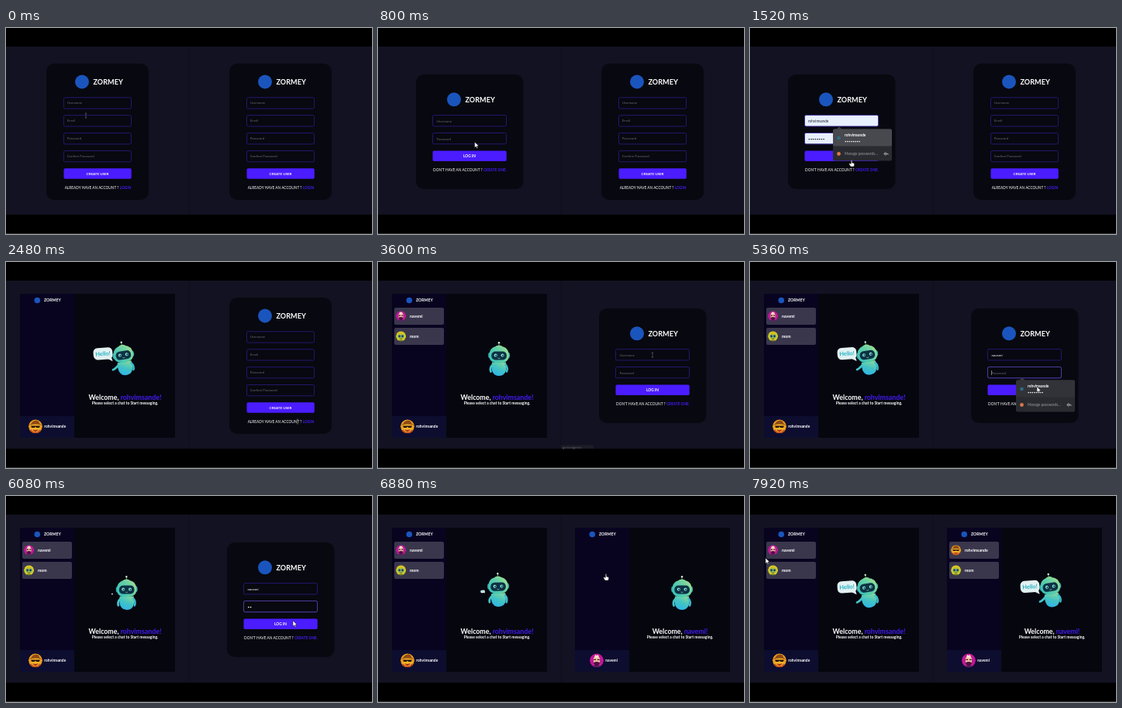
Recreate the animation shown at these times as an HTML page. Size 472 by 266 pixels, loop 8000 ms.

```html
<!DOCTYPE html>
<html lang="en">
<head>
<meta charset="utf-8">
<title>Two-window chat sign-in</title>
<style>
  html, body { margin: 0; width: 100%; height: 100%; overflow: hidden; background: #000; }
  svg { display: block; width: 100vw; height: 100vh; }
  text { font-family: Lato, "Open Sans", sans-serif; fill: #fff; white-space: pre; }
  .b { font-weight: 700; }
  .mid { text-anchor: middle; }
  .blue { fill: #431cf0; font-weight: 700; }
  .hint { fill: #66666e; }
  .note { fill: #9a9ba0; }
  .ink { fill: #20222c; }
  .hello { fill: #22b2c6; }
  .card { fill: #080810; }
  .field { fill: none; stroke: #2b1a86; stroke-width: .8; }
  .focus { stroke: #5646a8; }
  .filled { fill: #e8f0fe; }
  .button { fill: #4a1cff; }
</style>
</head>
<body>
<svg id="stage" viewBox="0 0 472 266" xmlns="http://www.w3.org/2000/svg">
  <defs>
    <linearGradient id="head" x1="0" y1=".6" x2="1" y2="0">
      <stop offset="0" stop-color="#3cc3b8"/>
      <stop offset=".6" stop-color="#6fd3a3"/>
      <stop offset="1" stop-color="#b5e58c"/>
    </linearGradient>
    <linearGradient id="body" x1=".8" y1="0" x2=".3" y2="1">
      <stop offset="0" stop-color="#86d99c"/>
      <stop offset=".5" stop-color="#41c3c4"/>
      <stop offset="1" stop-color="#2fb4ea"/>
    </linearGradient>
    <clipPath id="disc"><circle r="10"/></clipPath>

    <g id="av-hat" clip-path="url(#disc)">
      <circle r="10" fill="#eb9d1f"/>
      <path d="M-10 10V6Q0 3 10 6V10Z" fill="#c8501c"/>
      <ellipse cy="2" rx="6.5" ry="6" fill="#f2b22a"/>
      <path d="M-9-2Q0-4 9-2L5.5-4.5Q5-9 0-8.5T-5.5-4.5Z" fill="#8f4a16"/>
      <path d="M-6.5-.8H6.5L5.5 2H1.5L0 .5-1.5 2H-5.5Z" fill="#2a1510"/>
      <path d="M-4 4.5Q0 6 4 4.5 3 7.5 0 7.5T-4 4.5Z" fill="#a3281a"/>
    </g>
    <g id="av-pink" clip-path="url(#disc)">
      <circle r="10" fill="#c4159a"/>
      <path d="M-8 10Q0 3 8 10Z" fill="#5b1b6b"/>
      <path d="M-4.5-3L0-8 4.5-3V3Q0 9-4.5 3Z" fill="#ecc0a0"/>
      <path d="M-3.5-4L-2-8.5 0-6 2-8.5 3.5-4Z" fill="#f3e3c8"/>
      <path d="M-4-1H-1M1-1H4" stroke="#351032" stroke-width="1.6"/>
      <path d="M-4.5 3Q0 .5 4.5 3 3 8 0 8T-4.5 3Z" fill="#4a1438"/>
    </g>
    <g id="av-mom" clip-path="url(#disc)">
      <circle r="10" fill="#cfca24"/>
      <path d="M-7 10Q0 4 7 10Z" fill="#6a7a1d"/>
      <ellipse cy=".5" rx="6" ry="6.5" fill="#b0bd3c"/>
      <path d="M-6.5-3Q0-11 6.5-3Q0-5.5-6.5-3Z" fill="#e0b624"/>
      <g fill="#173a48" stroke="#4a98a5"><circle cx="-3" r="2.4"/><circle cx="3" r="2.4"/></g>
      <path d="M-2 5H2" stroke="#173a48"/>
    </g>

    <path id="arrow" d="M0 0V7.2L1.8 5.7 3 8.3 4.1 7.8 3 5.3 5.2 5.1Z" fill="#fff" stroke="#111" stroke-width=".5"/>
    <path id="hand" d="M-.7-3Q0-4 .7-3V0L3.2.7Q3.8 1 3.6 2L3 5H-1.2L-3.2 1.8Q-3-.1-.7 1.4Z" fill="#fff" stroke="#111" stroke-width=".5"/>
    <path id="beam" d="M-1.2-3H1.2M0-3V3M-1.2 3H1.2" fill="none" stroke="#85858f" stroke-width=".5"/>
  </defs>
</svg>
<script>
const LOOP = 8000, STEP = 80, HALF = 236;
const BRAND = 'ZORMEY', ANN = 'navemi', BOB = 'rohvimsande', MOM = 'mom';
const SECRET = '••••••••';
const AVATAR = { [ANN]: 'av-pink', [BOB]: 'av-hat', [MOM]: 'av-mom' };

const text = (x, y, size, str, cls = '') =>
  `<text x="${x}" y="${y}" font-size="${size}" class="${cls}">${str}</text>`;
const rect = (x, y, w, h, r, attrs) =>
  `<rect x="${x}" y="${y}" width="${w}" height="${h}" rx="${r}" ${attrs}/>`;
const on = (from, to, body) => `<g data-on="${from},${to}">${body}</g>`;
const at = (x, y, body) => `<g transform="translate(${x} ${y})">${body}</g>`;
const typed = (x, y, size, str, from, to) =>
  `<text x="${x}" y="${y}" font-size="${size}" data-typed="${str}" data-span="${from},${to}"></text>`;
const avatar = (name, x, y, r) =>
  `<use href="#${AVATAR[name]}" transform="translate(${x} ${y}) scale(${r / 10})"/>`;
const logo = (x, y, r) => `<circle cx="${x}" cy="${y}" r="${r}" fill="#1a55bd"/>`;

const header = y => logo(98, y, 9) + text(112.5, y + 3.4, 9.1, BRAND, 'b');
const hint = (x, y, str) => text(x, y, 4.4, str, 'hint');
const field = (x, y, w, cls = '') => rect(x, y, w, 14.3, 1.8, `class="field ${cls}"`);
const button = (x, y, w, label, size) =>
  rect(x, y, w, 13.5, 1.8, 'class="button"') + text(118, y + 8.3, size, label, 'b mid');
const footer = (y, ask, link) =>
  text(118.5, y, 4.75, `${ask} ? <tspan class="blue">${link}</tspan>`, 'mid');

const register = () =>
  rect(52, 46, 132, 176, 10, 'class="card"') + header(69.5) +
  ['Username', 'Email', 'Password', 'Confirm Password'].map((label, i) => {
    const y = 89.8 + 22.9 * i;
    return field(74.5, y, 87, '') + hint(78.7, y + 8.6, label);
  }).join('') +
  button(74.5, 181.2, 87.3, 'CREATE USER', 4.5) +
  footer(207.6, 'ALREADY HAVE AN ACCOUNT', 'LOGIN');

const userField = cls => field(70.5, 112.6, 95, cls);
const passField = cls => field(70.5, 135.5, 95, cls);
const login = () =>
  rect(49, 60, 138.5, 148, 10, 'class="card"') + header(92.3) +
  userField() + passField() +
  button(70.5, 158.6, 95.2, 'LOG IN', 4.8) +
  footer(184.8, "DON'T HAVE AN ACCOUNT", 'CREATE ONE.');

const savedLogin = (x, y, top) => at(x, y,
  '<path d="M4 .5L8-3 12 .5Z" fill="#3b3c42"/>' +
  rect(0, 0, 76, 41, 2, 'fill="#2a2b30"') + rect(0, 0, 76, 22, 2, `fill="${top}"`) +
  '<circle cx="7.5" cy="11.5" r="2.3" fill="#2b6f86"/>' +
  text(15, 9.3, 4.8, BOB, 'b') + text(15, 17.3, 4.4, SECRET) +
  '<circle cx="7.5" cy="32" r="2.4" fill="#d9784a"/>' +
  text(15, 33.6, 4.7, 'Manage passwords…', 'note') +
  '<path d="M66 32a1.6 1.6 0 1 0 0-.1H71V33.4" fill="none" stroke="#aaa" stroke-width=".9"/>');

const robot = id =>
  `<g id="${id}">
    <path d="M156 108V103" stroke="#5fbf9e" stroke-width=".8"/>
    <circle cx="156" cy="102.7" r="1.2" fill="#d8f2d0"/>
    <path class="arm" fill="none" stroke="#45c3c8" stroke-width="2.8" stroke-linecap="round"/>
    <path d="M147 128H165Q167 140 161.5 144 156 147 150.5 144 145 140 147 128Z" fill="url(#body)"/>
    <path d="M164.5 131Q168 135 166 140" fill="none" stroke="#3bbbd0" stroke-width="2.6" stroke-linecap="round"/>
    <rect x="142.2" y="115" width="27.8" height="8" rx="3" fill="#39a9a6"/>
    <path d="M143.5 120Q143 107.5 156 107 169 107.5 168.7 120 168.5 129 156 129 143.7 129 143.5 120Z" fill="url(#head)"/>
    <path d="M151 107.8Q156 104 161 107.8Z" fill="#8bdc93"/>
    <rect x="146.3" y="114" width="19.6" height="11" rx="5" fill="#0d3244"/>
    <g fill="#8eeadf"><circle cx="151.7" cy="119" r="2"/><circle cx="160.5" cy="119" r="2"/></g>
    <g fill="#0d3244"><circle cx="152.1" cy="119.2" r="1"/><circle cx="160.9" cy="119.2" r="1"/></g>
    <path d="M154.5 122.5Q156 123.8 157.5 122.5" fill="none" stroke="#8eeadf" stroke-width=".6"/>
  </g>
  <g id="${id}-bubble">
    <rect x="113.3" y="109" width="24.7" height="15.3" rx="5.5" fill="#e2f1f1"/>
    <path d="M130 123L137.5 127.3 136 121Z" fill="#e2f1f1"/>
    ${text(125.6, 119.3, 7.4, 'Hello!', 'b mid hello')}
  </g>`;

const contact = (name, y) =>
  rect(21, y, 64, 22, 2, 'fill="#3a374d"') + avatar(name, 29.6, y + 10.8, 6.6) +
  text(41, y + 12.8, 5.2, name, 'b');

const chat = (me, others, id, loaded, faceX) =>
  rect(18, 41, 200, 186, 0, 'fill="#06060f"') +
  rect(18, 41, 70, 186, 0, 'fill="#080420"') +
  logo(40.3, 49.5, 3.8) + text(49, 51.4, 5.2, BRAND, 'b') +
  on(loaded, LOOP, others.map((name, i) => contact(name, 59 + 26 * i)).join('')) +
  rect(18, 199, 70, 28, 0, 'fill="#0d0d30"') +
  avatar(me, faceX, 212.3, 9) + text(faceX + 11.3, 214, 4.9, me, 'b') +
  robot(id) +
  text(153.5, 177.6, 8.8, `Welcome, <tspan class="blue">${me}!</tspan>`, 'b mid') +
  text(153.5, 184.2, 4.95, 'Please select a chat to Start messaging.', 'b mid');

const linkTip = (from, to) => on(from, to,
  rect(0, 236.5, 42, 4.5, 0, 'fill="#1c1d26"') + hint(2, 241, 'go to sign-in'));

const left =
  on(0, 560, register()) +
  on(560, 2400, login() +
    on(560, 1120, hint(75.5, 121.5, 'Username') + hint(75.5, 144.5, 'Password')) +
    on(960, 1120, userField('focus')) +
    on(1120, 2400, userField('filled') + passField('filled') +
      text(75, 121.6, 4.7, BOB, 'ink') + text(75, 144.6, 4.6, SECRET, 'ink')) +
    on(960, 1600, savedLogin(107, 130.5, '#48494f'))) +
  on(2400, LOOP, chat(BOB, [ANN, MOM], 'bot-a', 2560, 38)) +
  linkTip(320, 640);

const right =
  on(0, 3440, register()) +
  on(3440, 6800, login() +
    on(3440, 4080, hint(75.5, 121.5, 'Username')) +
    on(3440, 5920, hint(75.5, 144.5, 'Password')) +
    on(3680, 5040, userField('focus')) +
    on(5040, 6800, passField('focus')) +
    on(5040, 5920, rect(75, 140, .5, 6, 0, 'fill="#ddd"')) +
    typed(75.5, 121.5, 4.5, ANN, 4080, 4880) +
    typed(75.5, 144.6, 4.6, SECRET, 5920, 6560) +
    on(5120, 5920, savedLogin(107, 152.5, '#323338'))) +
  on(6800, LOOP, chat(ANN, [BOB, MOM], 'bot-b', 6960, 46)) +
  linkTip(3280, 3680);

const stage = document.getElementById('stage');
stage.insertAdjacentHTML('beforeend',
  rect(0, 24, 472, 217, 0, 'fill="#121222"') +
  rect(235.5, 24, 1, 217, 0, 'fill="#0f0f1d"') +
  rect(0, 265, 472, 1, 0, 'fill="#303030"') +
  at(0, 0, left) + at(HALF, 0, right) + '<use id="cursor"/>');

// time, x, y, shape held until the next stop
const PATH = [
  [0, 103, 113, 'beam'], [160, 103, 113, 'arrow'], [400, 152, 206, 'hand'],
  [600, 152, 206, 'arrow'], [920, 112, 120, 'beam'], [1040, 116, 124, 'arrow'],
  [1200, 130, 142, 'arrow'], [1360, 130, 142, 'arrow'], [1520, 131, 174, 'hand'],
  [1760, 131, 174, 'arrow'], [2320, 363, 202, 'arrow'], [2480, 376, 206, 'beam'],
  [3200, 376, 206, 'beam'], [3280, 388, 206, 'hand'], [3440, 388, 206, 'arrow'],
  [3600, 354, 120, 'beam'], [4880, 354, 120, 'beam'], [5040, 354, 143, 'beam'],
  [5200, 354, 143, 'arrow'], [5360, 370, 161, 'arrow'], [6560, 370, 161, 'arrow'],
  [6880, 294, 104, 'hand'], [7200, 290, 76, 'hand'], [7600, 290, 76, 'arrow'],
  [7920, 20, 80, 'arrow'], [LOOP, 20, 80, 'arrow']
];

const $ = id => document.getElementById(id);
const clamp = v => Math.min(1, Math.max(0, v));
const ease = v => (v = clamp(v), v * v * (3 - 2 * v));
const range = str => str.split(',').map(Number);
const windows = [...stage.querySelectorAll('[data-on]')].map(el => [el, ...range(el.dataset.on)]);
const typing = [...stage.querySelectorAll('[data-typed]')].map(el => [el, ...range(el.dataset.span)]);
const cursor = $('cursor');

// The robot hops up, greets 200 ms later, then sinks back: one 3 s cycle.
function wave(id, t, start) {
  const p = (t - start + 9000) % 3000;
  const greet = ease((p - 200) / 260) * (1 - ease((p - 2300) / 220));
  const hop = ease(p / 300) * (1 - ease((p - 700) / 1700));
  const lift = 1.5 - 4 * hop;
  const bot = $(id);
  bot.setAttribute('transform', `translate(${-1.5 * greet} ${lift}) rotate(${-9 * greet} 156 140)`);
  bot.querySelector('.arm').setAttribute('d',
    `M148 131Q${143.5 - greet} ${135 + greet} ${145.5 - 5.5 * greet} ${140 - 4 * greet}`);
  $(id + '-bubble').setAttribute('transform',
    `translate(138 ${126.5 + lift / 2}) scale(${greet}) rotate(-4) translate(-138 -126)`);
}

function draw(now) {
  const t = Math.floor(now % LOOP / STEP) * STEP;
  for (const [el, from, to] of windows)
    el.style.display = t >= from && t < to ? '' : 'none';
  for (const [el, from, to] of typing) {
    const str = el.dataset.typed;
    const n = t < from ? 0 : 1 + Math.floor((str.length - 1) * clamp((t - from) / (to - from)));
    el.textContent = str.slice(0, n);
  }
  wave('bot-a', t, 6600);
  wave('bot-b', t, 6900);

  const i = PATH.findIndex(stop => stop[0] > t);
  const [t0, x0, y0, shape] = PATH[i - 1], [t1, x1, y1] = PATH[i];
  const k = ease((t - t0) / (t1 - t0));
  cursor.setAttribute('href', '#' + shape);
  cursor.setAttribute('transform', `translate(${x0 + (x1 - x0) * k} ${y0 + (y1 - y0) * k})`);
}

function tick() {
  draw(performance.now());
  requestAnimationFrame(tick);
}
tick();
</script>
</body>
</html>
```
